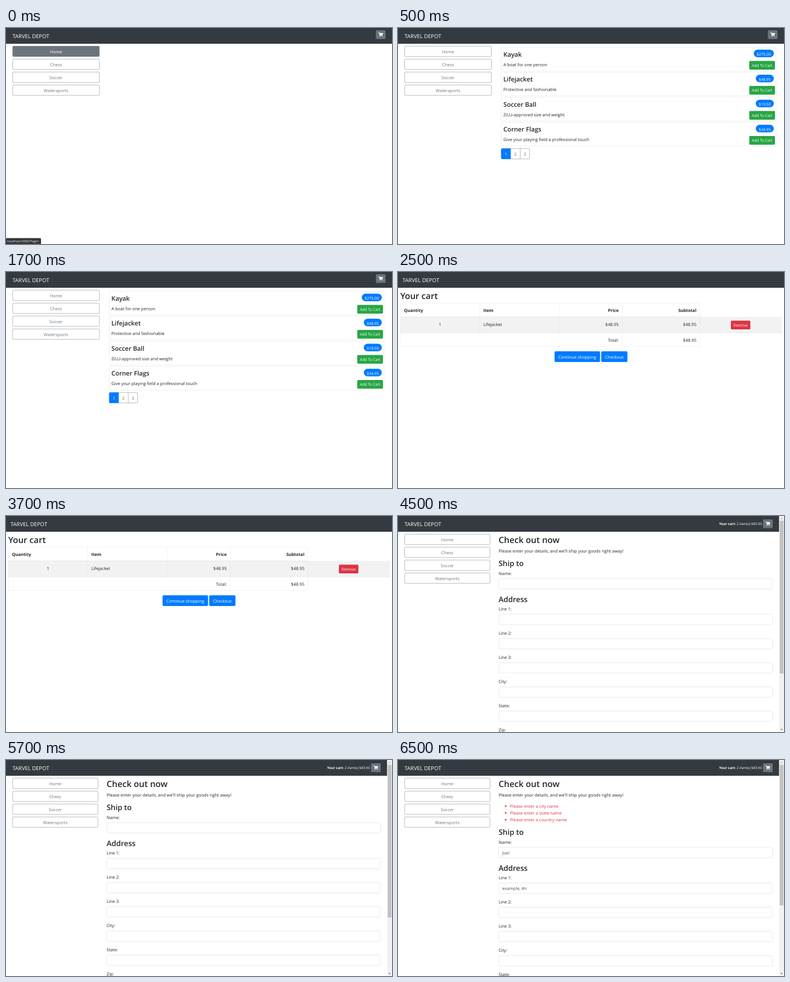
An HTML page for the animation above (8000 ms loop, 683 by 384 pixels).

```html
<!DOCTYPE html>
<html lang="en">
<head>
<meta charset="utf-8">
<title>Shop demo</title>
<style>
html, body { margin: 0; width: 100%; height: 100%; overflow: hidden; background: #fff; }
svg { display: block; width: 100%; height: 100%; }
text { font-family: "Open Sans", "Noto Sans", sans-serif; text-rendering: geometricPrecision; white-space: pre; }
</style>
</head>
<body>
<svg id="stage" viewBox="0 0 1366 768"></svg>
<script>
const INK = '#212529', DARK = '#343a40', GRAY = '#6c757d', BLUE = '#007bff',
      GREEN = '#28a745', RED = '#dc3545', LINE = '#dee2e6';
const SCALE = 0.948; // brings the font to the intended x-height

const text = (x, y, s, { size = 16, fill = INK, weight = 400, anchor = 'start' } = {}) =>
  `<text x="${x}" y="${y}" font-size="${size * SCALE}" fill="${fill}" font-weight="${weight}" text-anchor="${anchor}">${s}</text>`;

const rect = (x, y, w, h, fill, r = 0) =>
  `<rect x="${x}" y="${y}" width="${w}" height="${h}" rx="${r}" fill="${fill}"/>`;

const frame = (x, y, w, h, stroke, r = 4) =>
  `<rect x="${x + .5}" y="${y + .5}" width="${w - 1}" height="${h - 1}" rx="${r}" fill="none" stroke="${stroke}"/>`;

const path = (d, attrs) => `<path d="${d}" ${attrs}/>`;

const button = (x, y, w, h, label, fill, size = 16) =>
  rect(x, y, w, h, fill, size / 4) +
  text(x + w / 2, y + h / 2 + size * .38, label, { size, fill: '#fff', anchor: 'middle' });

const outline = (x, y, w, h, label) =>
  frame(x, y, w, h, GRAY) + text(x + w / 2, y + 25, label, { fill: GRAY, anchor: 'middle' });

const heading = (x, y, s, size) => text(x, y, s, { size, weight: 600 });

const navbar = (x, w = 1366) =>
  rect(0, 0, w, 56, DARK) + text(x, 36, 'TARVEL DEPOT', { size: 20, fill: '#fff' });

const cart = (x, y) => rect(x, y, 34, 31, GRAY, 3) +
  `<g transform="translate(${x + 9} ${y + 8})" fill="#fff">` +
  path('M0 0H4L4.5 1.8H16L14.4 9H6L6.2 10H14.2L13.9 11.4H4.6L2.7 1.8H0Z', '') +
  '<circle cx="5.4" cy="12.6" r="1.6"/><circle cx="13.2" cy="12.6" r="1.6"/></g>';

const menu = (w, active) => ['Home', 'Chess', 'Soccer', 'Watersports'].map((s, i) =>
  (s === active ? button(23, 64, w, 38, s, GRAY) : outline(23, 64 + 46 * i, w, 38, s))).join('');

const store = active => navbar(23) + cart(1309, 8) + menu(308, active);

function loading() {
  return store('Home') +
    path('M0 747H120Q124 747 124 751V768H0Z', 'fill="#35363a"') +
    text(4, 762, 'localhost:5000/Page1', { size: 12, fill: '#e8eaed' });
}

function products() {
  const items = [
    ['Kayak', 'A boat for one person', '$275.00'],
    ['Lifejacket', 'Protective and fashionable', '$48.95'],
    ['Soccer Ball', 'ZILU-approved size and weight', '$19.50'],
    ['Corner Flags', 'Give your playing field a professional touch', '$34.95']
  ];
  const cards = items.map(([name, info, price], i) => {
    const y = 68 + 89 * i, w = price.length > 6 ? 71 : 64;
    return frame(365, y, 974, 85, '#dfdfdf') +
      heading(373, y + 33, name, 23.6) + text(373, y + 67, info) +
      rect(1330 - w, y + 9, w, 27, BLUE, 13.5) +
      text(1330 - w / 2, y + 30, price, { size: 14.4, fill: '#fff', anchor: 'middle' }) +
      button(1243, y + 49, 91, 31, 'Add To Cart', GREEN, 14);
  }).join('');
  const pages = frame(365, 428, 101, 38, GRAY) +
    path('M432.5 428V466', `stroke="${GRAY}"`) +
    path('M399 428H369Q365 428 365 432V462Q365 466 369 466H399Z', `fill="${BLUE}"`) +
    [1, 2, 3].map(n => text(348.5 + 33.5 * n, 453, n,
      { fill: n === 1 ? '#fff' : GRAY, anchor: 'middle' })).join('');
  return store() + cards + pages;
}

function basket() {
  const end = { anchor: 'end' }, bold = { weight: 700 }, boldEnd = { ...bold, ...end };
  return navbar(16) + heading(8, 96, 'Your cart', 32) +
    rect(8, 161, 1350, 56, '#f2f2f2') +
    path('M8.5 265V110.5H1068.5V265M8 264.5H1069M8 216.5H1357.5V160.5H1068M289.5 110V217M570.5 110V217M793.5 110V265',
      `fill="none" stroke="${LINE}"`) +
    path('M8 160H1069', `stroke="${LINE}" stroke-width="2"`) +
    text(21, 141, 'Quantity', bold) + text(302, 141, 'Item', bold) +
    text(781, 141, 'Price', boldEnd) + text(1056, 141, 'Subtotal', boldEnd) +
    text(149, 191, '1', { anchor: 'middle' }) + text(302, 191, 'Lifejacket') +
    text(781, 191, '$48.95', end) + text(1056, 191, '$48.95', end) +
    button(1178, 173, 69, 31, 'Remove', RED, 14) +
    text(781, 247, 'Total:', end) + text(1056, 247, '$48.95', end) +
    button(554, 282, 161, 38, 'Continue shopping', BLUE) +
    button(719, 282, 93, 38, 'Checkout', BLUE);
}

function checkout(errors, values, thumbEnd) {
  const dy = errors.length ? 88 : 0;
  const field = (label, y) => text(356, y + dy, label + ':') +
    frame(356, y + 13 + dy, 970, 38, '#ced4da') +
    text(369, y + 38 + dy, values[label] || '', { fill: '#495057' });
  const lines = ['Line 1', 'Line 2', 'Line 3', 'City', 'State', 'Zip'];
  return navbar(23, 1349) + cart(1292, 12) + menu(303) +
    text(1288, 31, '<tspan font-weight="700">Your cart:</tspan> 2 item(s) $83.90',
      { size: 12.8, fill: '#fff', anchor: 'end' }) +
    heading(356, 96, 'Check out now', 32) +
    text(356, 129, 'Please enter your details, and we\'ll ship your goods right away!') +
    errors.map((s, i) => `<circle cx="381" cy="${164 + 24 * i}" r="3" fill="${RED}"/>` +
      text(396, 169 + 24 * i, `Please enter a ${s} name`, { fill: RED })).join('') +
    heading(356, 178 + dy, 'Ship to', 28) + field('Name', 209) +
    heading(356, 305 + dy, 'Address', 28) +
    lines.map((s, i) => field(s, 336 + 86 * i)).join('') +
    rect(1349, 0, 17, 768, '#f1f1f1') + rect(1351, 17, 13, thumbEnd - 17, '#c1c1c1') +
    path('M1354 10.5L1357.5 6.5L1361 10.5Z', 'fill="#a3a3a3"') +
    path('M1354 757.5L1357.5 761.5L1361 757.5Z', 'fill="#505050"');
}

const scenes = [
  [0, loading()],
  [500, products()],
  [2500, basket()],
  [4500, checkout([], {}, 560)],
  [6500, checkout(['city', 'state', 'country'], { Name: 'Joel', 'Line 1': 'example, #n' }, 517)]
];
const stage = document.getElementById('stage');
const start = performance.now();
let shown;

function draw() {
  const t = (performance.now() - start) % 8000;
  const scene = scenes.filter(s => s[0] <= t).pop();
  if (scene !== shown) stage.innerHTML = (shown = scene)[1];
  requestAnimationFrame(draw);
}
draw();
</script>
</body>
</html>
```
